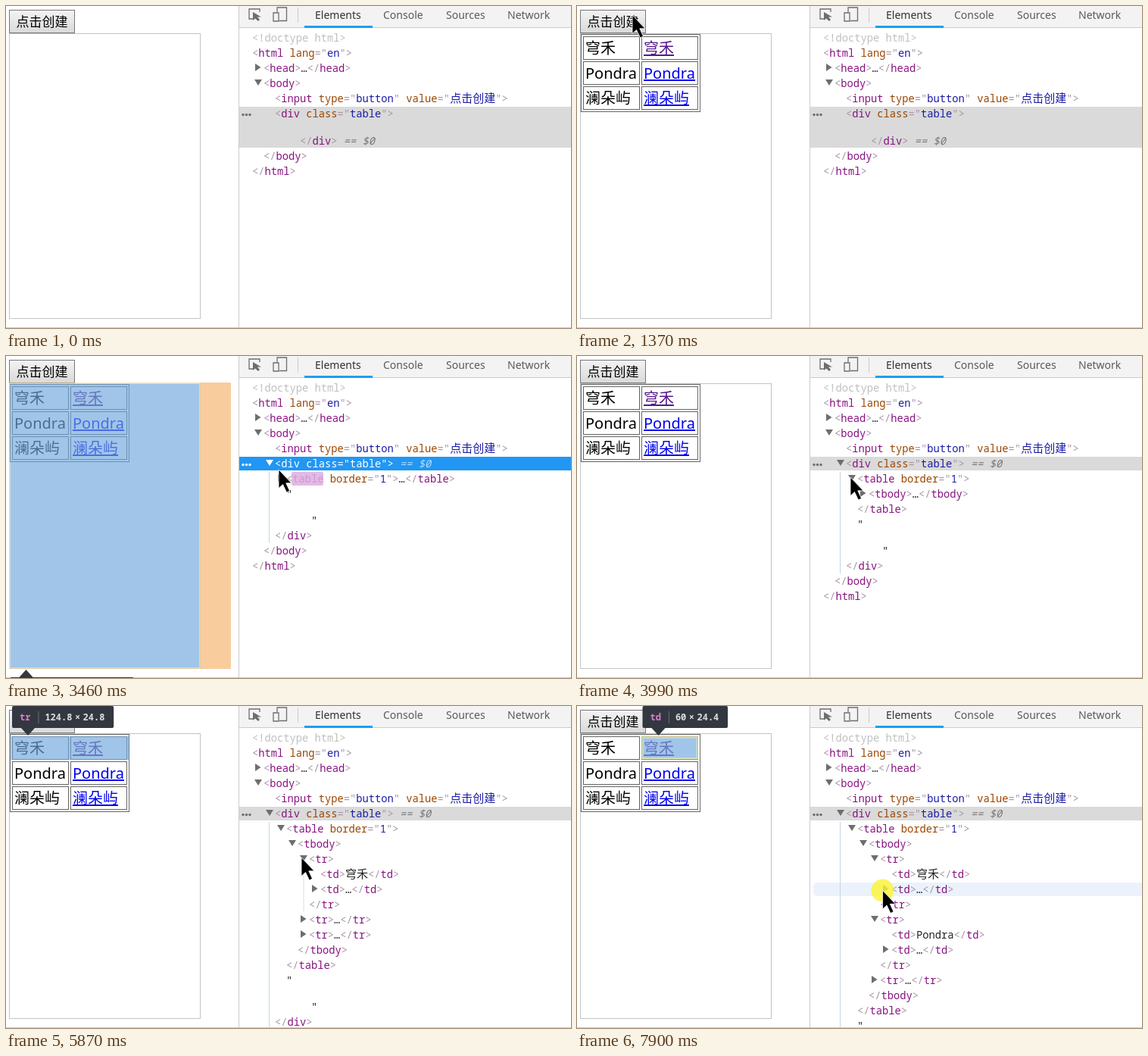
These frames come from a looping animation (746x425 px, 8 s). An HTML page:

```html
<!DOCTYPE html>
<html lang="zh-CN">
<head>
<meta charset="utf-8">
<style>
html, body { margin: 0; width: 100%; height: 100%; overflow: hidden; background: #fff; }
svg { display: block; }
text { white-space: pre; font-family: 'Noto Sans', 'Noto Sans CJK SC', sans-serif; }
.tab { font-size: 14px; fill: #5a5a5a; }
.page { font-size: 20px; }
.link { fill: #00e; text-decoration: underline; }
.seen { fill: #551a8b; }
.code { font: 13.75px 'Noto Sans Mono', 'Noto Sans CJK SC', monospace; fill: #222; }
.cjk { font-size: 15px; }
.p { fill: #a894a6; }
.n { fill: #881280; }
.a { fill: #994500; }
.v { fill: #1a1aa6; }
.doc { fill: #c0c0c0; }
.eq { fill: #777; font-style: italic; }
.sel, .sel tspan { fill: #fff; }
.sel .eq { fill: #b8defb; }
.tip { font: bold 12px 'Noto Sans Mono', monospace; fill: #ddd; }
</style>
</head>
<body>
<svg width="746" height="425" viewBox="0 0 746 425">
  <defs>
    <linearGradient id="face" x2="0" y2="1">
      <stop stop-color="#f3f3f3"/><stop offset="1" stop-color="#d9d9d9"/>
    </linearGradient>
  </defs>
  <g id="scene"></g>
  <circle id="halo" r="15" fill="#fbf432" fill-opacity=".8"/>
  <path id="cursor" d="M0 0V24.5L5.5 19.5L10.5 30L14.5 28L9.8 17.8H17Z" stroke="#fff" stroke-width=".8"/>
</svg>
<script>
const LOOP = 8000;
const NAMES = ['穹禾', 'Pondra', '澜朵屿'];
const CONTENT = 'rgba(111,168,220,.66)', PADDING = 'rgba(147,196,125,.55)',
      BORDER = 'rgba(255,229,153,.66)', MARGIN = 'rgba(246,178,107,.66)';

// Times at which the page and the tree change
const MADE = 1370, UPDATED = 1430, DIV = 3110, TABLE = 3990, TBODY = 4920, ROW1 = 5870, ROW2 = 7190;

const PATH = [ // time, x, y
  [0, 552, 430], [139, 552, 430], [140, 552, 380], [270, 554, 165], [440, 554, 165],
  [1220, 73, 12], [1750, 73, 12], [2600, 341, 131], [2610, 341, 131], [2900, 346, 139],
  [3300, 346, 139], [3460, 360, 150], [3600, 361, 160], [4230, 361, 160], [4450, 374, 182],
  [5240, 374, 182], [5640, 390, 200], [6190, 390, 200], [6560, 400, 274], [6960, 391, 275],
  [7440, 391, 275], [7660, 403.5, 243.5], [LOOP, 403.5, 243.5]
];
const CLICKS = [[1300, 1370], [2960, 3040], [3840, 3970], [4620, 4770], [5700, 5870], [7030, 7150], [7900, LOOP]];

const HOVERS = [ // time, hovered row, outlined element, guide line x, top, bottom
  [0], [200, 0, 'div'], [680, 122, 'input'], [750, 102, 'body'], [820],
  [2420, 122, 'input'], [2700, 0, 'div'], [3540, 162, 'table'], [3990],
  [4310, 182, 'tbody'], [4920, 0, 'tbody', 378, 193, 271],
  [5400, 202, 'tr1'], [5870, 0, 'tr1', 393, 213, 271],
  [6260, 222, 'td1'], [6330, 242, 'td2'], [6480, 262, 'tr1'], [6640, 282, 'tr2'],
  [7190, 0, 'tr2', 393, 293, 351], [7500, 262, 'tr1'], [7570, 242, 'td2']
];

// Boxes run from outside in as [x0, y0, x1, y1, colour]; tip: tag, width, height, tip y, 1 = below
const OUTLINES = {
  input: { boxes: [[4, 5, 91, 36, BORDER], [6, 7, 89, 34, PADDING], [14, 9, 82, 32, CONTENT]], tip: ['input', '69.31', '24.4', 36.5, 1] },
  body: { boxes: [[4, 5, 297, 413, CONTENT]], tip: ['body', '234.4', '326.4', 414, 1] },
  div: { boxes: [[4, 35, 297, 413, MARGIN], [4, 35.5, 256.5, 412.5, BORDER], [5.5, 37, 255.5, 411.5, CONTENT]], tip: ['div.table', '200', '300', 414, 1] },
  table: { boxes: [[5, 37, 163, 140, BORDER], [6, 38, 162, 139, CONTENT]], tip: ['table', '126.4', '82.4', 141, 1] },
  tbody: { boxes: [[6.5, 38.5, 162.5, 139.5, CONTENT]], tip: ['tbody', '124.8', '80.8', 36] },
  tr1: { boxes: [[6.5, 40, 162.5, 71, CONTENT]], tip: ['tr', '124.8', '24.8', 39] },
  tr2: { boxes: [[6.5, 73, 162.5, 104, CONTENT]], tip: ['tr', '124.8', '24.8', 72] },
  td1: cell(8), td2: cell(85)
};
function cell(x) {
  return {
    boxes: [[x, 40, x + 75, 70.5, BORDER], [x + 1, 41, x + 74, 69.5, PADDING], [x + 2.5, 42.5, x + 72.5, 68, CONTENT]],
    tip: ['td', '60', '24.4', 39]
  };
}

const rect = (x, y, w, h, fill, more = '') => `<rect x="${x}" y="${y}" width="${w}" height="${h}" fill="${fill}" ${more}/>`;
const frame = (x, y, w, h, stroke, fill = 'none', more = '') =>
  rect(x + .5, y + .5, w - 1, h - 1, fill, `stroke="${stroke}" ${more}`);
const text = (x, y, cls, s) => `<text x="${x}" y="${y}" class="${cls}">${s}</text>`;
const span = (cls, s) => `<tspan class="${cls}">${s}</tspan>`;
const path = (d, fill, more = '') => `<path d="${d}" fill="${fill}" ${more}/>`;

function colour(src) {
  if (src.startsWith('<!')) return span('doc', src.replace('<', '&lt;'));
  return src.replace(/(<\/?)(\w+)|( \w+)(=")([^"]*)(")|>| ==.*/g, (all, open, name, attr, eq, value, quote) =>
    open ? span('p', open.replace('<', '&lt;')) + span('n', name)
    : attr ? span('a', attr) + span('p', eq) + span('v', value) + span('p', quote)
    : all === '>' ? span('p', '&gt;') : span('eq', all)
  ).replace(/[\u4e00-\u9fff]+/g, s => span('cjk', s));
}

function page(made) {
  let s = frame(4, 36, 253, 377, '#c4c4c4') + frame(4, 5, 87, 31, '#777', 'url(#face)') +
    `<text x="13.5" y="27" font-size="17">点击创建</text>`;
  if (!made) return s;
  s += frame(5, 37, 158, 103, '#666');
  NAMES.forEach((name, i) => {
    const y = 40 + i * 33;
    s += frame(8, y, 75, 31, '#666') + frame(85, y, 75, 31, '#666') +
      text(11, y + 23, 'page', name) + text(88, y + 23, 'page link' + (i ? '' : ' seen'), name);
  });
  return s;
}

function toolbar() {
  const tabs = [[408, 'Elements'], [498, 'Console'], [581, 'Sources'], [662, 'Network']];
  const line = 'stroke="#6e6e6e" stroke-width="1.3"';
  return rect(308, 0, 438, 28, '#f3f3f3') + rect(308, 28, 438, 1, '#ccc') + rect(307, 0, 1, 425, '#ccc') +
    path('M326 17H321V4H335V8', 'none', line) + path('M326 8V19L329 16.5L333 20L335 18L332 14.5H337Z', '#6e6e6e') +
    path('M358 8V2H370.5V19.5H361M353 9H360V20H353Z', 'none', line) +
    rect(385, 2, 1, 20, '#ccc') + rect(394, 26, 90, 3, '#1a9ff0') +
    tabs.map(([x, s], i) => text(x, 17, 'tab', i ? s : `<tspan fill="#333">${s}</tspan>`)).join('');
}

function tree(t) {
  const focused = t >= 3040 && t < 3840;
  let y = 22, s = '';
  const row = (depth, src, arrow, gap = 20, selected) => {
    y += gap;
    const x = 325 + depth * 15;
    const white = selected && focused;
    if (arrow) {
      const d = arrow === 'v' ? `M${x - 12} ${y - 5}h10l-5 8z` : `M${x - 11} ${y - 6}v10l7.5 -5z`;
      s += path(d, white ? '#fff' : '#6e6e6e');
    }
    s += text(x, y + 5, white ? 'code sel' : 'code', colour(src));
  };
  const entry = (name, open) => {
    if (!open) return row(5, '<tr>…</tr>', '>');
    row(5, '<tr>', 'v');
    row(6, `<td>${name}</td>`);
    row(6, '<td>…</td>', '>');
    row(5, '</tr>');
  };

  row(0, '<!doctype html>');
  row(0, '<html lang="en">');
  row(1, '<head>…</head>', '>');
  row(1, '<body>', 'v');
  row(2, '<input type="button" value="点击创建">');
  if (t < UPDATED) {
    row(2, '<div class="table">');
    row(4.2, '</div> == $0', '', 36);
  } else if (t < DIV) {
    row(2, '<div class="table">…</div> == $0', '>', 20, true);
  } else {
    row(2, '<div class="table"> == $0', 'v', 20, true);
    if (t < TABLE) row(3, '<table border="1">…</table>', '>');
    else {
      row(3, '<table border="1">', 'v');
      if (t < TBODY) row(4, '<tbody>…</tbody>', '>');
      else {
        row(4, '<tbody>', 'v');
        entry(NAMES[0], t >= ROW1);
        entry(NAMES[1], t >= ROW2);
        entry(NAMES[2], false);
        row(4, '</tbody>');
      }
      row(3, '</table>');
    }
    row(3, '"');
    row(5.2, '"', '', 35);
    row(2, '</div>');
    s += rect(347, 153, 1, y + 10 - 153, '#c3d5e6');
  }
  row(1, '</body>');
  row(0, '</html>');

  const dots = [313, 317.5, 322].map(x => `<circle cx="${x}" cy="143.5" r="1.7" fill="${focused ? '#fff' : '#6e6e6e'}"/>`);
  return rect(308, 133, 438, t < UPDATED ? 54 : 18, focused ? '#2196f3' : '#dadada') + dots.join('') + s;
}

function tooltip(left, [tag, w, h, y, below]) {
  const x = left + 1.5, mid = x + 21, dir = below ? 1 : -1;
  const top = below ? y + 10 : y - 39;
  const bar = x + 20 + tag.length * 7.2, dims = bar + 9;
  const width = dims + (w + h).length * 7.2 + 26 - x;
  return path(`M${mid} ${y}l9 ${10 * dir}h-18z`, '#333740') + rect(x, top, width, 29, '#333740', 'rx="2"') +
    rect(bar, top + 7, 1, 16, '#6b6e76') +
    text(x + 10, top + 19, 'tip', `<tspan fill="#e07fd0">${tag}</tspan>`) +
    text(dims, top + 19, 'tip', `${w}<tspan dx="3.5">×</tspan><tspan dx="3.5">${h}</tspan>`);
}

function outline({ boxes, tip }) {
  const loop = ([a, b, c, d]) => `M${a} ${b}H${c}V${d}H${a}Z`;
  return boxes.map((box, i) =>
    path(loop(box) + (boxes[i + 1] ? loop(boxes[i + 1]) : ''), box[4], 'fill-rule="evenodd"')
  ).join('') + tooltip(boxes[0][0], tip);
}

function scene(t) {
  const [, hover, target, gx, g0, g1] = HOVERS.findLast(h => h[0] <= t);
  let s = page(t >= MADE) + toolbar();
  if (hover) s += rect(312, hover - 9, 440, 18, '#ebf2fb', 'rx="5"');
  s += tree(t);
  if (gx) s += rect(gx - .5, g0, 1, g1 - g0, '#ddd');
  if (t >= UPDATED && t < 1680) s += rect(363, 133, 25, 18, '#dcb0de', 'rx="2" opacity=".8"');
  if (t >= DIV && t < 3560) s += rect(377, 153, 42, 18, '#dcb0de', 'rx="2" opacity=".85"');
  s += rect(0, 424, 746, 1, '#ccc');
  return target ? s + outline(OUTLINES[target]) : s;
}

function pointer(t) {
  const i = PATH.findIndex(k => k[0] > t);
  const [t0, x0, y0] = PATH[i - 1], [t1, x1, y1] = PATH[i];
  const u = (t - t0) / (t1 - t0), e = u * u * (3 - 2 * u);
  return `translate(${x0 + (x1 - x0) * e} ${y0 + (y1 - y0) * e})`;
}

const get = id => document.getElementById(id);
const start = performance.now();
let shown = '';
function draw() {
  const t = (performance.now() - start) % LOOP;
  const next = scene(t), place = pointer(t);
  if (next !== shown) get('scene').innerHTML = shown = next;
  get('cursor').setAttribute('transform', place);
  get('halo').setAttribute('transform', place);
  get('halo').style.display = CLICKS.some(([a, b]) => t >= a && t < b) ? '' : 'none';
  requestAnimationFrame(draw);
}
draw();
</script>
</body>
</html>
```
